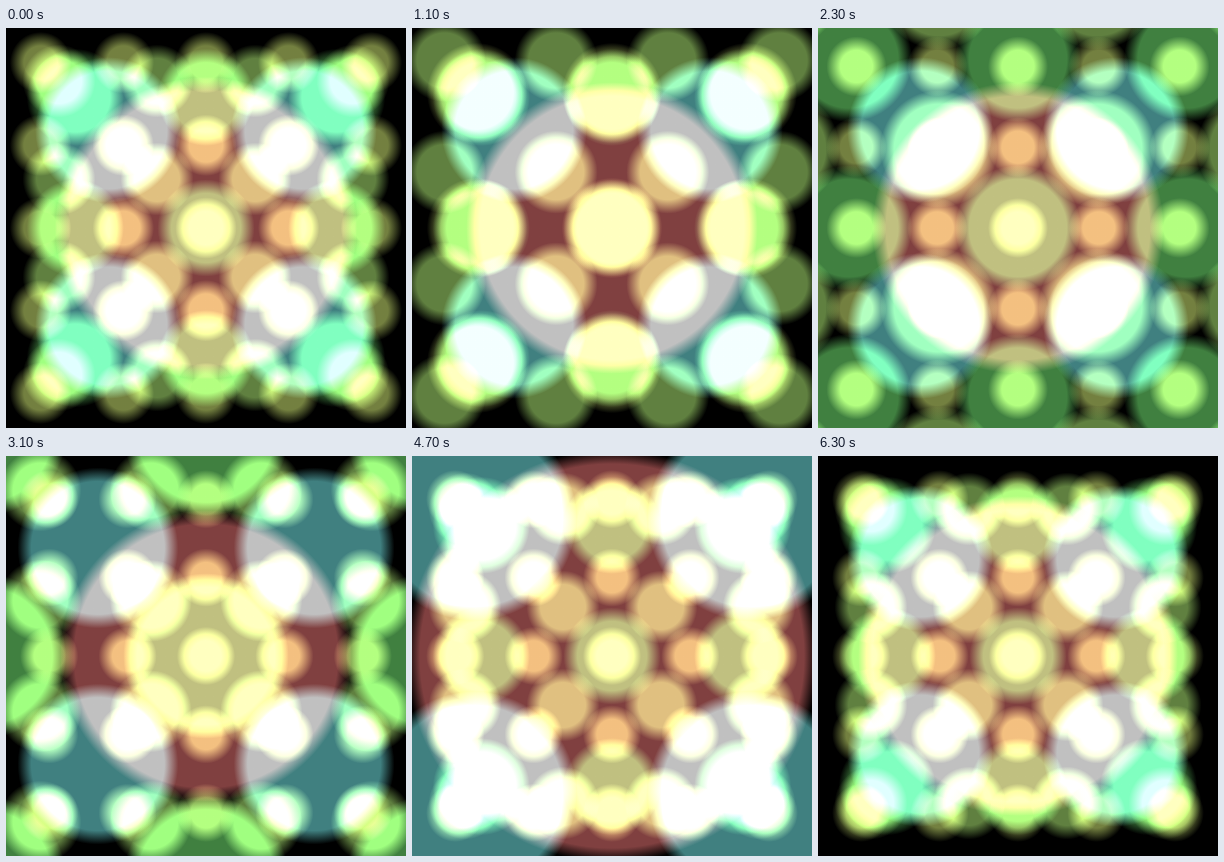
Animation, 400 px wide and 400 px high, one loop 6400 ms. Source, as an HTML page with a canvas:

```html
<!DOCTYPE html>
<html>
<head>
<meta charset="utf-8">
<style>
html, body { margin: 0; width: 100%; height: 100%; overflow: hidden; background: #000; }
canvas { display: block; }
</style>
</head>
<body>
<canvas id="stage" width="400" height="400"></canvas>
<script>
const ctx = document.getElementById('stage').getContext('2d');
const SIZE = 400, LOOP = 6400, STEP = 100;
const HALF_WIDTH = 1220, SWELL = 0.74;
const REACH = 0.372, EDGE = 14;

// Time at which each n-by-n grid is widest.
const peaks = [5240, 4150, 3040, 2090, 1130];

// Linear rise and fall around the peak, flat elsewhere in the loop.
function swell(time, peak) {
  const away = Math.abs((time - peak + LOOP * 1.5) % LOOP - LOOP / 2);
  return SWELL * Math.max(0, 1 - away / HALF_WIDTH);
}

function softDisc(x, y, radius, hue) {
  if (x + radius < 0 || y + radius < 0 || x - radius > SIZE || y - radius > SIZE) return;
  const color = alpha => `hsla(${hue}, 33.33%, 37.65%, ${alpha})`;
  const fill = ctx.createRadialGradient(x, y, radius - EDGE, x, y, radius);
  fill.addColorStop(0, color(1));
  fill.addColorStop(1, color(0));
  ctx.fillStyle = fill;
  ctx.beginPath();
  ctx.arc(x, y, radius, 0, Math.PI * 2);
  ctx.fill();
}

function drawGrid(n, time) {
  const spacing = 0.98 * SIZE / n * (1 + swell(time, peaks[n - 1]));
  const place = i => SIZE / 2 + (i - (n - 1) / 2) * spacing;
  for (let row = 0; row < n; row++) {
    for (let col = 0; col < n; col++) {
      softDisc(place(col), place(row), spacing * REACH, 360 / n);
    }
  }
}

function render(now) {
  const time = Math.floor(now / STEP) * STEP % LOOP;
  ctx.globalCompositeOperation = 'source-over';
  ctx.fillStyle = '#000';
  ctx.fillRect(0, 0, SIZE, SIZE);
  ctx.globalCompositeOperation = 'lighter';
  for (let n = 1; n <= 5; n++) drawGrid(n, time);
}

let start = null;
function tick(now) {
  if (start === null) start = now;
  render(now - start);
  requestAnimationFrame(tick);
}
render(0);
requestAnimationFrame(tick);
</script>
</body>
</html>
```
